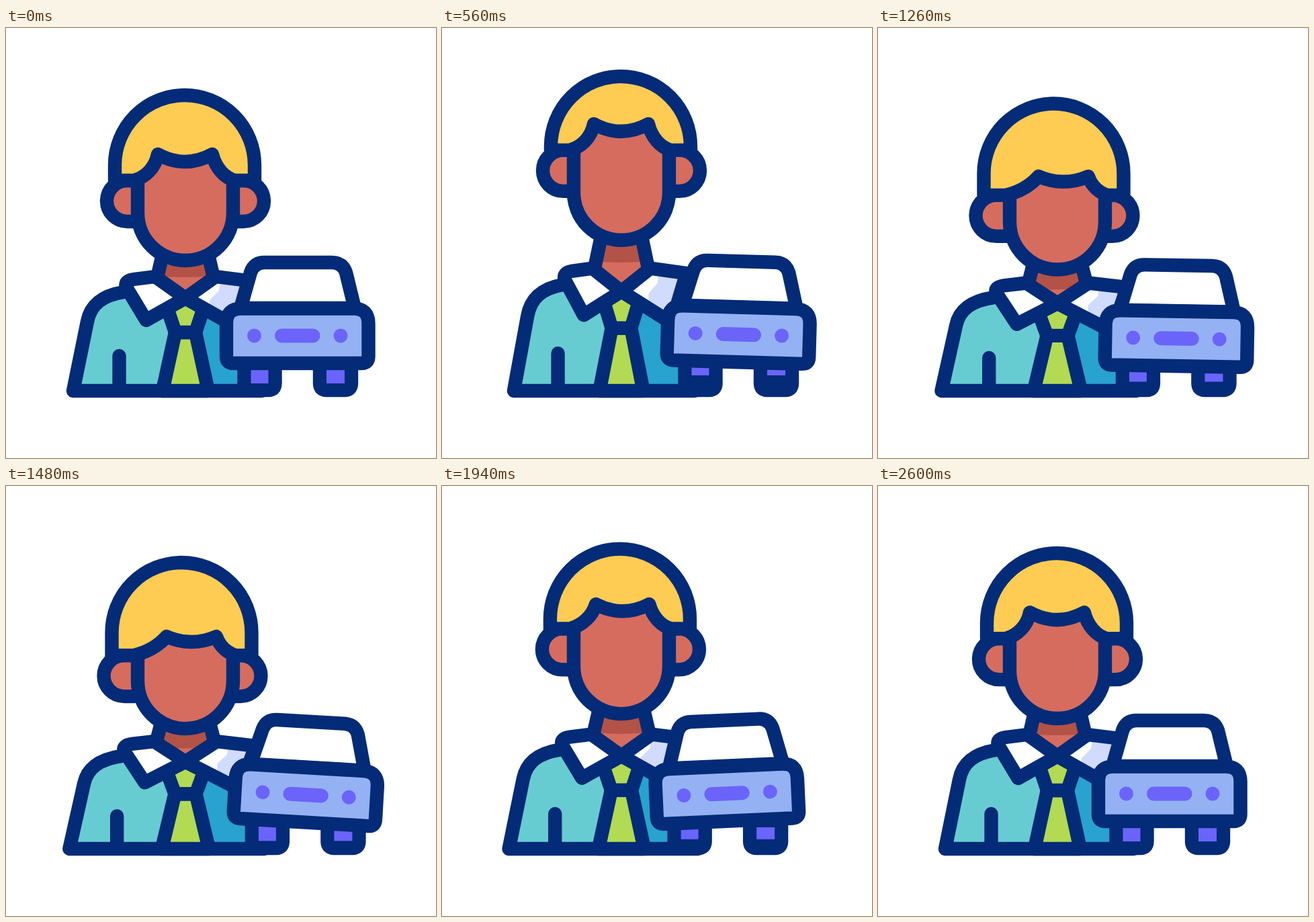
Animation, 640 px wide and 640 px high, one loop 2880 ms. Source, as an HTML page:

```html
<!DOCTYPE html>
<html lang="en">
<head>
<meta charset="utf-8">
<title>Driver and car</title>
<style>
  html, body { margin: 0; width: 100%; height: 100%; overflow: hidden; background: #fff; }
  svg { display: block; width: 100%; height: 100%; }
  .line { stroke: #032b77; stroke-width: 20.4; stroke-linejoin: round; stroke-linecap: round; vector-effect: non-scaling-stroke; }
  .skin { fill: #d66c5e; }
  .white { fill: #fff; }
  .teal { fill: #67ccd1; }
  .blue { fill: #28a2ce; }
  .lime { fill: #b2da53; }
  .violet { fill: #6a64fb; }
  .none { fill: none; }
</style>
</head>
<body>
<svg viewBox="0 0 640 640">
  <defs>
    <clipPath id="neckClip"><path d="M224 372L237 320H297L310 372L267 402Z"/></clipPath>
    <clipPath id="collarClip"><path d="M267 402L312 370L368 377L345 446Z"/></clipPath>
  </defs>

  <g id="body">
    <path class="teal" d="M100 540L121 437C126 411 144 398 175 393L267 402V540Z"/>
    <path class="blue" d="M267 402L340 420L381 430V540H267Z"/>
    <path class="line none" d="M175 393C144 398 126 411 121 437L100 540H381M168.500 540V488"/>
    <path class="line lime" d="M252 453L233 540H301L282 453Z"/>
    <path class="line lime" d="M267 402L240 417L252 453H282L294 417Z"/>
    <path class="skin" d="M224 372L237 320H297L310 372L267 402Z"/>
    <g clip-path="url(#neckClip)">
      <path id="neckShade" fill="#b35246" d="M200 270H334V366Q267 376 200 366Z"/>
    </g>
    <path class="line none" d="M226 367L237 320M308 367L297 320"/>
    <path class="line white" d="M267 402L222 370L190 374Q176 376 179 386L208.500 435Z"/>
    <path class="white" d="M267 402L312 370L368 377L345 446Z"/>
    <g clip-path="url(#collarClip)">
      <path id="collarShade" fill="#d0dbfd" d="M321 360L317 391L303 405V450H400V360Z"/>
    </g>
    <path class="line none" d="M267 402L312 370L368 377L345 446Z"/>
  </g>

  <path id="ears" class="line skin" d="M196 227H180.500a30.500 30.500 0 0 0 0 61H196M338 227H353.500a30.500 30.500 0 0 1 0 61H338"/>
  <path id="face" class="line skin"/>
  <path id="hair" class="line" fill="#fecc52"/>

  <g id="wheels">
    <path class="line" fill="#032b77" d="M354.500 490V529q0 10 10 10h26q10 0 10-10V490ZM467 490V529q0 10 10 10h27q10 0 10-10V490Z"/>
    <path id="hubs" class="violet"/>
  </g>
  <g id="car">
    <path class="line white" d="M349 417L364 364Q369 349 385 349H485Q501 349 506 364L519 417Z"/>
    <path class="line" fill="#94b1f3" d="M328 489V440Q328 417.500 350 417.500H517.500Q539.500 417.500 539.500 440V489q0 10-10 10H338q-10 0-10-10Z"/>
    <rect class="violet" x="400" y="447.500" width="67.500" height="21" rx="10.500"/>
    <circle class="violet" cx="369.500" cy="458" r="10.500"/>
    <circle class="violet" cx="498" cy="458" r="10.500"/>
  </g>
</svg>
<script>
  const LOOP = 2880;
  const $ = id => document.getElementById(id);
  const set = (id, name, value) => $(id).setAttribute(name, value);

  // Eases in and out between [time, value] poses
  const motion = (...poses) => t => {
    const i = poses.findIndex(([time]) => time > t);
    if (i === 0) return poses[0][1];
    if (i < 0) return poses[poses.length - 1][1];
    const [t0, a] = poses[i - 1], [t1, b] = poses[i];
    return a + (b - a) * (1 - Math.cos(Math.PI * (t - t0) / (t1 - t0))) / 2;
  };

  const stretch = motion([220, 0], [560, .073], [870, -.028], [1380, -.06], [1480, -.06], [1770, .045], [2080, -.028], [2600, 0]);
  const bob = motion([220, 0], [570, -28], [870, 5], [1400, 14], [1540, 14], [1810, -15], [2160, 13], [2600, 0]);
  const turning = motion([560, 0], [1080, 1], [1560, 1], [2120, 0]);
  const swing = motion([220, 0], [530, 8], [910, -15], [1400, 16], [1760, -14], [2240, 0]);
  const bounce = motion([220, 0], [750, -2.5], [1350, 4.5], [1680, -4], [2160, 2.6], [2600, 0]);
  const hubLift = motion([220, 0], [560, -12], [950, -4], [1700, 0], [2200, -7], [2600, 0]);
  const axle = motion([1300, 0], [1700, 15], [2200, 0]);

  function drawBody(t, turn, nod, carX) {
    const tall = 1 + stretch(t), wide = 1 - .58 * stretch(t + 20);
    set('body', 'transform', `translate(267 540) scale(${wide} ${tall}) translate(-267 -540)`);
    set('neckShade', 'transform', `translate(0 ${nod * .2 + turn * 5})`);
    set('collarShade', 'transform', `translate(${carX * .8} 0)`);
  }

  function drawHead(t, turn, nod) {
    const shift = -4.5 * turn, rise = bob(t);
    set('ears', 'transform', `translate(${shift} ${nod})`);
    set('face', 'd', `M196 ${190 + nod}V${275 + rise * 1.08}a71 71 0 0 0 142 0V${190 + nod}Z`);

    const left = 162 + shift, right = 370 + shift;
    const top = 204 + rise, base = 227 + nod, tip = 188 + nod + 11 * turn;
    const tipL = 226 + 13 * turn, tipR = 307 + 6 * turn;
    set('hair', 'd', `M${left} ${base}V${top}A104 104 0 0 1 ${right} ${top}V${base}H341
      C${325 + 5 * turn} ${base - 4} ${tipR + 5} ${tip + 20 - 5 * turn} ${tipR} ${tip}
      Q${(tipL + tipR) / 2} ${tip + 22 - 6 * turn} ${tipL} ${tip}
      C${tipL - 4 - 6 * turn} ${tip + 20 - 9 * turn} ${208 + 4 * turn} ${base - 5} 190 ${base}Z`);
  }

  function drawCar(t, carX) {
    const hubTop = 500 + axle(t), hubEnd = 529 + hubLift(t);
    set('wheels', 'transform', `translate(${carX * .92} 0)`);
    set('hubs', 'd', `M364.5 ${hubTop}h26V${hubEnd}h-26ZM477 ${hubTop}h27V${hubEnd}h-27Z`);
    // The tilt trails behind the sideways swing
    set('car', 'transform', `translate(${carX} ${bounce(t)}) rotate(${swing(t - 65) * .21} 433.75 458)`);
  }

  function draw(t) {
    const turn = turning(t), carX = swing(t);
    const nod = bob(t - 25) * 1.65 + turn * 2;
    drawBody(t, turn, nod, carX);
    drawHead(t, turn, nod);
    drawCar(t, carX);
  }

  const start = performance.now();
  function tick() {
    draw((performance.now() - start) % LOOP);
    requestAnimationFrame(tick);
  }
  tick();
</script>
</body>
</html>
```
